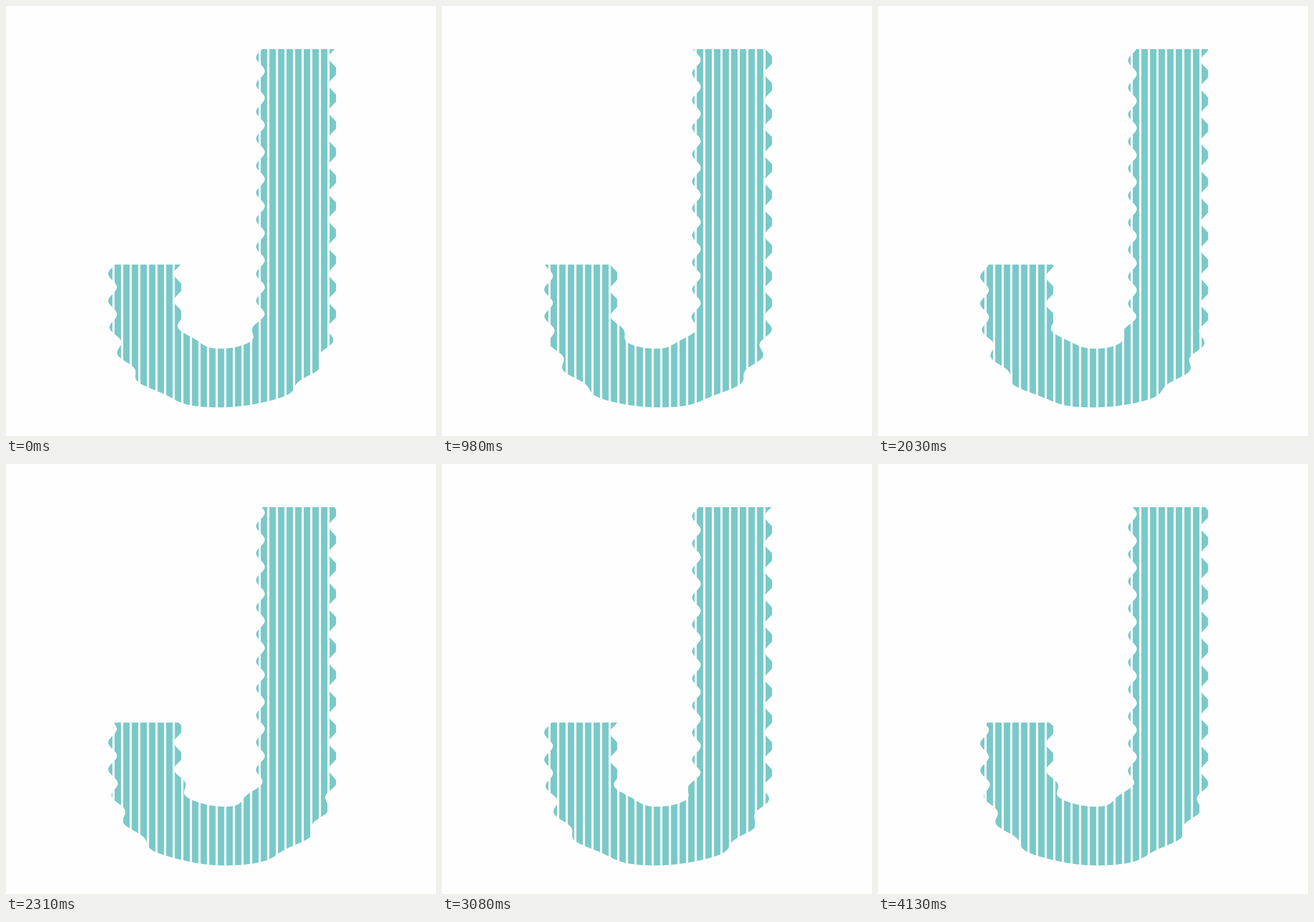
An HTML page with a canvas that plays this animation: 748 px wide and 748 px high, repeating every 4200 ms.

```html
<!DOCTYPE html>
<html lang="en">
<head>
<meta charset="utf-8">
<title>Wavy striped J</title>
<style>
  html, body { margin: 0; width: 100%; height: 100%; overflow: hidden; background: #fefefe; }
  canvas { display: block; }
</style>
</head>
<body>
<canvas id="stage" width="748" height="748"></canvas>
<script>
const SIZE = 748, PAPER = '#fefefe', TEAL = '#79c9c8';
const STEP_MS = 70, STEPS = 60;
const WAVE = 47, AMPLITUDE = 7.5;
const PITCH = SIZE / 50, GAP = SIZE / 200;
const TOP = 75, HOOK_TOP = 449.7, BEND = 526, MIDDLE = 375, ROUNDNESS = 2.25;
const ctx = document.getElementById('stage').getContext('2d');

// Height of a wave crest; each half of the loop climbs with growing speed.
function crestAt(step) {
  const half = STEPS / 2, k = step % half;
  return step < half
    ? 19.2 - 1.36 * k - 0.003 * k * k
    : 42 - 1.36 * k - 0.0117 * k * k;
}

function wavePoint(x, y, crest) {
  ctx.lineTo(x + AMPLITUDE * Math.cos(2 * Math.PI * (y - crest) / WAVE), y);
}

function upright(x, from, to, crest) {
  const count = Math.ceil(Math.abs(to - from));
  for (let i = 0; i <= count; i++) wavePoint(x, from + (to - from) * i / count, crest);
}

// Lower half of a superellipse, swept between two upright edges.
function bowl(fromX, toX, bottom, crest) {
  const count = 400, power = 2 / ROUNDNESS;
  for (let i = 1; i < count; i++) {
    const angle = Math.PI * i / count, c = Math.cos(angle);
    const side = c > 0 ? fromX : toX;
    wavePoint(MIDDLE + (side - MIDDLE) * Math.abs(c) ** power,
              BEND + (bottom - BEND) * Math.sin(angle) ** power, crest);
  }
}

function draw(step) {
  const crest = crestAt(step);
  ctx.fillStyle = PAPER;
  ctx.fillRect(0, 0, SIZE, SIZE);

  ctx.fillStyle = TEAL;
  ctx.beginPath();
  upright(568.9, TOP, BEND, crest);
  bowl(568.9, 185.4, 698.2, crest);
  upright(185.4, BEND, HOOK_TOP, crest);
  upright(299.8, HOOK_TOP, BEND, crest);
  bowl(299.8, 442.6, 596, crest);
  upright(442.6, BEND, TOP, crest);
  ctx.fill();

  ctx.fillStyle = PAPER;
  for (let x = PITCH / 2; x < SIZE; x += PITCH) {
    ctx.fillRect(x - GAP / 2, 0, GAP, SIZE);
  }
}

const begin = performance.now();
function tick() {
  draw(Math.floor((performance.now() - begin) / STEP_MS) % STEPS);
  requestAnimationFrame(tick);
}
tick();
</script>
</body>
</html>
```
